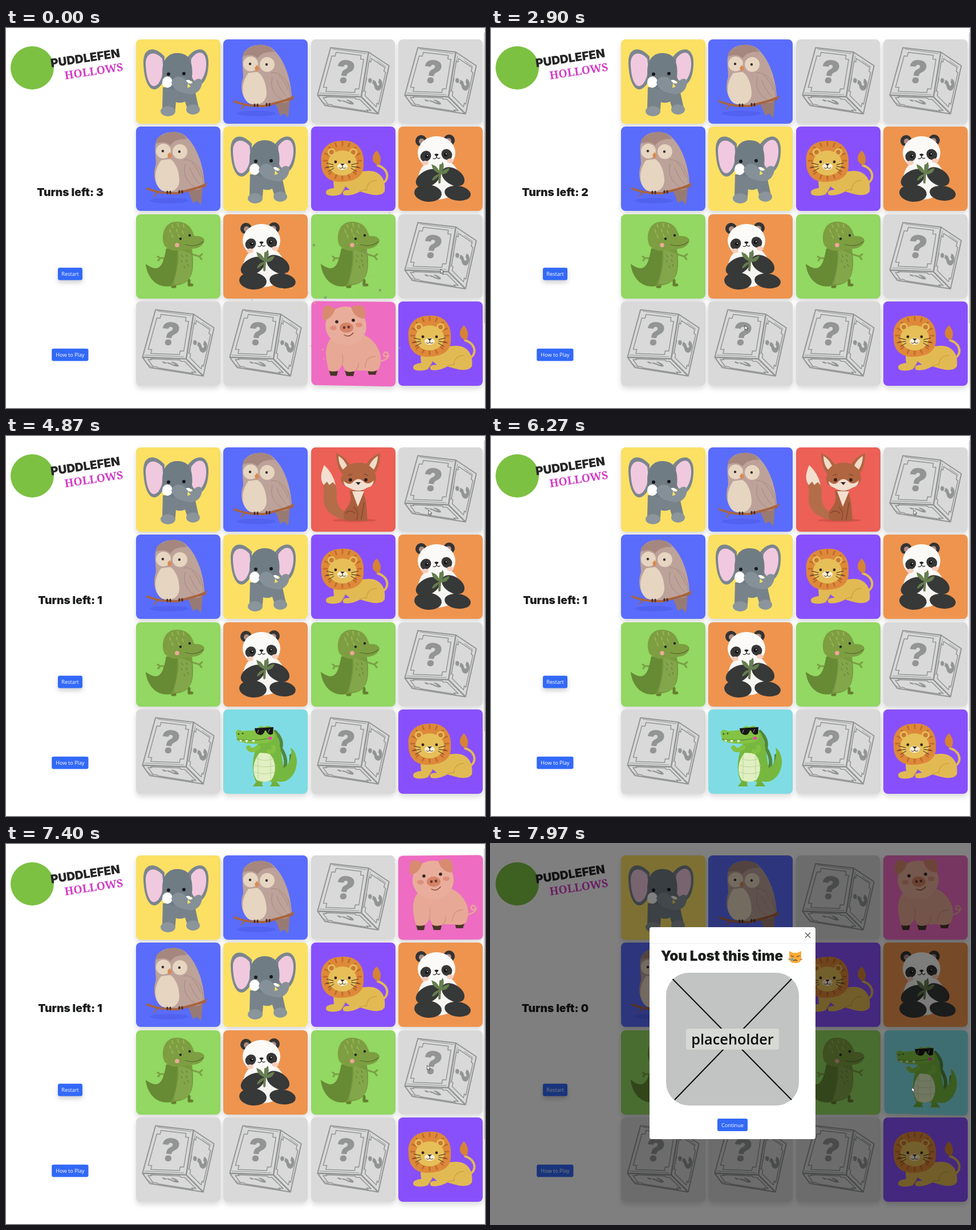
These frames come from a looping animation (840x667 px, 8000 ms). An HTML page:

```html
<!DOCTYPE html>
<html lang="en">
<head>
<meta charset="utf-8">
<title>Memory game</title>
<style>
html, body { margin: 0; width: 100%; height: 100%; overflow: hidden; background: #fff; }
#stage { position: relative; width: 100%; height: 100%; overflow: hidden; contain: strict; }
#stage > * { position: absolute; left: 0; top: 0; width: 840px; height: 667px; }
svg { display: block; overflow: hidden; }
text { text-anchor: middle; font-family: "Open Sans", sans-serif; }
.heavy { font-family: Inter, sans-serif; font-weight: 900; }
#stage > #grid { left: 228px; top: 20px; width: 607.5px; height: 607.5px; perspective: 1740px; }
.card { position: absolute; width: 147.5px; height: 147.5px; transform-style: preserve-3d; }
.face { position: absolute; inset: 0; border-radius: 8px; backface-visibility: hidden;
  box-shadow: 0 5px 10px rgba(0,0,0,.15); }
.front { transform: rotateY(180deg); }
#shade { background: #000; }
</style>
</head>
<body>
<div id="stage">
<svg>
  <circle cx="46" cy="70" r="38" fill="#7cc142"/>
  <g transform="translate(140 60) rotate(-8.5)">
    <text class="heavy" font-size="20.5" fill="#262626">PUDDLEFEN</text>
  </g>
  <g transform="translate(155 82.5) rotate(-8.5)">
    <text font-size="19.4" style="font-family:'Noto Serif',serif;font-weight:600" fill="#d23cc6">HOLLOWS</text>
  </g>
  <text id="turns" class="heavy" x="112.5" y="295" font-size="19.3" fill="#1c1f1c"></text>
  <rect x="91" y="420.7" width="43" height="21.7" rx="3" fill="#3269f6" style="filter:drop-shadow(0 4px 4px #0003)"/>
  <text x="112.5" y="435.3" font-size="9.2" fill="#fff">Restart</text>
  <rect x="80.2" y="562.8" width="64.3" height="21.7" rx="3" fill="#3269f6"/>
  <text x="112.5" y="577.3" font-size="9.2" fill="#fff">How to Play</text>
  <g id="bar"><path d="M838 0h2v667h-2z" fill="#f3f3f3"/><path d="M838 8h2v510h-2z" fill="#cfcfcf"/></g>
</svg>
<div id="grid"></div>
<svg><g id="confetti"></g></svg>
<div id="shade"></div>
<svg><g id="modal">
  <rect x="278" y="146" width="291" height="372" rx="4" fill="#fff"/>
  <path d="M278 174.5h291" stroke="#e9ecef"/>
  <path d="M551 155.5l9 9m0-9l-9 9" stroke="#555" stroke-width="1.3"/>
  <text class="heavy" x="405" y="205" font-size="24.2" fill="#1c1f1c">You Lost this time</text>
  <path d="M523 199L523 188L530 191H537L544 188V199Q545 209 533.5 209Q522 209 523 199Z" fill="#fbab38"/>
  <path d="M526 196l5 2m10-2l-5 2M530 205q3.5-3 7 0" fill="none" stroke="#5a3a24" stroke-width="1.3"/>
  <path d="M528 199q-4 5 0 6q4-1 0-6" fill="#4aa4ee"/>
  <path d="M521 202l4 1m21-1l-4 1" stroke="#8a5a2c"/>
  <rect x="307" y="226" width="233" height="233" rx="40" fill="#c2c3c3"/>
  <path d="M318.5 237L527 449M527 237L322 449" stroke="#0b0b0b" stroke-width="2"/>
  <rect x="342" y="324" width="163" height="37" rx="4" fill="#d7d9d4"/>
  <text x="423.5" y="351.5" font-size="25.3" font-weight="600" fill="#0b0b0b">placeholder</text>
  <rect x="397" y="482" width="53" height="22" rx="3" fill="#3269f6"/>
  <text x="423.5" y="496.5" font-size="9.2" fill="#fff">Continue</text>
</g></svg>
<svg><path id="cursor" d="M0 0V8L2 6.3L3.3 9.2L4.8 8.5L3.5 5.7H6Z" fill="#fff" stroke="#333" stroke-width=".8"/></svg>
</div>
<script>
const $ = id => document.getElementById(id);
const clamp = v => Math.max(0, Math.min(1, v));

// Drawing helpers: filled path, line, ellipse, several equal dots
const p = (fill, d) => `<path d="${d}" fill="${fill}"/>`;
const l = (stroke, w, d) =>
  `<path d="${d}" fill="none" stroke="${stroke}" stroke-width="${w}" stroke-linecap="round" stroke-linejoin="round"/>`;
const e = (fill, x, y, rx, ry = rx, turn = 0) =>
  `<ellipse cx="${x}" cy="${y}" rx="${rx}" ry="${ry}" fill="${fill}" transform="rotate(${turn} ${x} ${y})"/>`;
const dots = (fill, r, ...pts) => pts.map(([x, y]) => e(fill, x, y, r)).join('');

function dice() {
  const A = [34, 14], B = [101, 22], C = [88, 101], D = [11, 98], R = [137, 46], S = [118, 131], T = [24, 116];
  const ink = '#939595';
  const frame = (q, w, k, notch) => {
    const mid = [0, 1].map(i => q.reduce((s, v) => s + v[i], 0) / 4);
    const pts = q.map(v => v.map((c, i) => mid[i] + (c - mid[i]) * k));
    const mix = (a, b, f) => a.map((c, i) => c + (b[i] - c) * f);
    const path = pts.flatMap((v, i) => {
      const a = mix(v, pts[(i + 3) % 4], notch), b = mix(v, pts[(i + 1) % 4], notch);
      return [a, [a[0] + b[0] - v[0], a[1] + b[1] - v[1]], b];
    });
    return l(ink, w, 'M' + path.join('L') + 'Z');
  };
  const mark = (m, size) =>
    `<text class="heavy" transform="matrix(${m})" y="${size * .36}" font-size="${size}" fill="${ink}">?</text>`;
  return [[A, B, C, D], [B, R, S, C], [D, C, S, T]].map(q =>
      frame(q, 2, .99, 0) + frame(q, 1.5, .82, .1)).join('') +
    l(ink, 1, 'M38 17L97 25M15 94L84 97M18 109l14 8m84-80l15 11M92 92l6-24M104 29l-4 18') +
    mark('.98 .1 -.15 .98 60 57', 56) +
    mark('-.2 .85 -.7 -.3 112 77', 46) +
    mark('.4 .42 -.9 -.12 60 109', 40);
}

const rays = Array.from({ length: 16 }, (_, i) => {
  const a = i * Math.PI / 8, at = r => `${55 + r * Math.cos(a)} ${60 + r * Math.sin(a)}`;
  return `M${at(27)}L${at(33)}`;
}).join('');

const art = {
  elephant: ['#fbe064',
    p('#7b868e', 'M50 30C32 10 12 14 13 42C14 74 24 92 36 87C46 82 50 70 50 60ZM90 32C106 10 126 14 127 38C128 64 118 84 106 80C98 77 92 66 92 60Z') +
    p('#f1c9df', 'M46 34C32 18 16 24 17 44C18 72 26 86 35 81C44 76 47 60 48 50ZM97 34C108 18 122 20 123 40C124 60 114 78 106 75C98 72 96 60 95 50Z') +
    p('#77828a', 'M47 84L46 124Q46 133 58 133Q69 132 69 122L70 110Q78 113 86 109L90 122Q92 131 103 131Q113 128 109 116L102 84Z') +
    e('#8b959b', 56, 126, 13, 9) + e('#8b959b', 100, 123, 12, 9) +
    p('#707c84', 'M72 24C48 24 43 50 48 70C50 84 62 90 78 88C98 86 100 66 98 48C96 32 88 24 72 24Z') +
    e('#fff', 55, 75, 9, 10) + e('#fff', 91, 78, 7) +
    p('#869098', 'M62 76C66 62 82 62 89 74Q96 82 103 72Q110 66 116 72C116 92 102 99 88 95C74 92 66 88 62 76Z') +
    p('#fbe064', 'M91 77l5 6l-6 2z') + dots('#17191b', 3, [57, 61], [84, 60])],
  owl: ['#5a6cfb',
    e('#5162f0', 58, 130, 34, 5) +
    p('#987a75', 'M90 110L100 134L107 130L114 138L117 106Z') +
    p('#bda29a', 'M36 24C44 9 66 7 82 13C104 28 118 64 120 99C119 110 108 112 96 111C80 116 58 117 48 113C32 104 29 84 35 66C35 52 31 36 36 24Z') +
    p('#a6877f', 'M36 22Q48 10 68 9L82 13L90 22Q70 20 60 33Q50 24 35 30Z') +
    p('#e6d5c0', 'M44 59C31 76 30 102 45 112C60 118 76 112 76 94C75 74 68 62 60 57Z') +
    l('#a6877f', 1, 'M84 58C108 58 118 80 118 100M86 66q-6 26 17 40m-5-43q10 10 16 26M94 72q7 19 17 28') +
    dots('#e6d5c0', 13, [48, 43], [77, 44]) + dots('#3a2c33', 2.2, [47, 43], [76, 44]) +
    p('#d98a50', 'M59 45l4 6l-5 6l-3-7z') +
    l('#a8643f', 4, 'M20 109Q42 118 72 117L121 104') + l('#a8643f', 2, 'M96 111l28-11M38 115l-6 7') +
    l('#49302c', 3, 'M55 114v3m5-3v3M76 113v3m5-3v3')],
  lion: ['#8850fd',
    l('#e2ba54', 4, 'M121 102C140 94 136 74 117 68') + p('#d68336', 'M119 68C104 64 106 50 115 42C123 50 124 60 119 68Z') +
    p('#e2ba54', 'M38 82L40 108Q22 110 27 119Q36 124 52 119L60 105L68 111Q52 111 57 120Q70 123 86 114L100 118Q122 124 129 114C132 92 120 76 98 78Z') +
    l('#c99f3e', 1.2, 'M60 105q-4 9-9 14M97 112q2-18 18-17M86 113l12-3') +
    p('#de893a', 'M55 25C82 23 94 44 92 64C94 87 78 96 55 97C32 99 17 86 18 62C15 39 32 24 55 25Z') +
    l('#c06e2d', 3, rays) + dots('#e7bf59', 7, [36, 45], [74, 45]) + dots('#c77a35', 4, [36, 45], [74, 45]) +
    e('#e7bf59', 55, 64, 25, 22) + e('#fff1d2', 55, 70, 9, 6) + dots('#332722', 2.4, [43, 62], [67, 62]) +
    p('#332722', 'M51 65h8l-4 4z') +
    l('#332722', 1, 'M55 69v3q-4 3-6 0m6 0q4 3 6 0M39 67l-12-3m12 6l-13 2m14 1l-10 6M71 67l12-3m-12 6l13 2m-14 1l10 6')],
  panda: ['#ee944e',
    dots('#343434', 10, [40, 25], [89, 24]) + dots('#ad8b82', 5, [41, 26], [88, 25]) +
    e('#f6f5f2', 71, 92, 36, 36) + e('#fbfaf7', 67, 46, 33, 29) +
    e('#373737', 48, 52, 9, 10, 40) + e('#373737', 85, 49, 9, 10, -40) +
    dots('#111', 3, [50, 52], [83, 49]) + dots('#fff', 1, [51, 51], [84, 48]) + p('#252525', 'M63 49q4-3 8 0l-4 4z') +
    l('#252525', 1.2, 'M67 53q-1 5-6 3m6-3q2 5 6 2') + e('#f5cdbd', 47, 64, 6, 4) + e('#f5cdbd', 91, 60, 6, 4) +
    e('#373838', 52, 91, 23, 14, -28) + e('#373838', 96, 88, 22, 14, 32) +
    e('#373838', 52, 117, 24, 15, 5) + e('#373838', 104, 117, 23, 13, 8) +
    l('#6b7d52', 4, 'M74 68L72 98') +
    p('#667f50', 'M73 83Q60 79 58 66Q71 70 73 83Q70 71 78 62Q83 74 73 83Q81 73 90 73Q86 86 73 83Q67 93 59 95Q61 85 73 83')],
  lizard: ['#92d862',
    l('#7ba044', 3, 'M52 77L42 77l-4-3m4 3l-3 4M98 70l13 4l5-4m-5 4l4 5') +
    l('#667f2f', 5, 'M68 116v11h-4m29-11v8h5') +
    p('#769941', 'M53 60C48 88 42 106 17 87C20 114 40 132 67 125C95 124 105 106 98 61Z') +
    p('#678a35', 'M53 60C48 88 42 106 17 87C20 114 40 132 62 125C72 103 74 76 72 58Z') +
    p('#83a64b', 'M73 60C77 76 72 103 66 122C94 125 102 107 97 70Z') +
    p('#7d9e41', 'M71 13C47 13 43 42 50 55C60 67 78 65 90 61Q116 62 120 46Q118 37 102 38C97 20 87 13 71 13Z') +
    l('#9ab554', 2, 'M63 18l2 5m8-7l2 6m8-4l1 5M59 27l2 5m10-6l1 5m9-2l2 5M63 36l2 5m9-6l2 5') +
    l('#6b8937', 1.5, 'M80 72l2 3m6-4l2 3M79 81l2 3m7-4l2 3M84 91l2 3m4-6l2 3') +
    dots('#222c1b', 2.2, [78, 43], [94, 37]) + e('#f0a79c', 72, 54, 3.8) + l('#526c2d', 1.2, 'M86 53q18 6 32-5')],
  pig: ['#ee6cc2',
    l('#e7aa98', 2.5, 'M122 104q15-4 13-12q-5-8-8 0q0 6 9 2') +
    p('#483426', 'M31 121l3 10h11l2-8zm28 0l3 10h12l2-8zm40-2l2 9h12l3-9z') +
    p('#e7a996', 'M40 58C21 78 25 98 31 122Q40 126 49 120L55 111L60 122Q68 126 78 121L96 121Q113 125 119 117C130 92 112 64 88 57Z') +
    l('#d68f7c', 1.3, 'M54 112q3-8 1-18m23 27q6-6 5-13M95 116q0-20 18-20') +
    e('#e9ae9b', 61, 43, 36, 34) +
    p('#d88b70', 'M42 13Q26 4 22 11Q17 30 23 34Q38 29 42 13ZM70 10Q84 4 92 9Q98 22 94 30Q76 30 70 10Z') +
    e('#dd8f7c', 39, 47, 6, 4) + e('#dd8f7c', 84, 41, 6, 4) + dots('#30231f', 2.8, [45, 36], [74, 33]) +
    e('#d58367', 62, 46, 12, 9) + dots('#6b392e', 2.4, [58, 46], [66, 45]) + l('#7f4539', 1.3, 'M58 59q9 5 16-4')],
  croc: ['#7fdce4',
    l('#52883a', 6, 'M91 39Q105 53 101 68Q116 92 104 109Q120 104 119 81') +
    p('#76b83f', 'M64 54C50 78 49 110 57 126L59 132H68L69 126H84L86 132H96L94 126C115 132 130 111 129 89Q127 72 118 67Q123 91 106 103C102 80 99 51 91 40Z') +
    p('#e1efc3', 'M64 76C51 91 50 112 59 124Q72 130 84 124C95 110 92 87 80 77Z') +
    l('#b7d695', 1, 'M58 86q14 7 31 0M55 98q18 6 37 0M55 110q18 6 35 0M61 80v42m22-42v41') +
    l('#83c243', 8, 'M61 66Q50 76 44 67M88 66Q91 75 80 74') +
    p('#83c243', 'M22 41Q23 33 34 38L59 36Q63 26 72 31Q84 24 90 40Q92 58 72 59Q47 63 25 55Z') +
    l('#4d7f31', 1.2, 'M24 52q24 5 54-1') + p('#fff', 'M28 53l3 4l2-3zm10 1l3 4l3-4zm12 0l3 4l3-4z') +
    p('#e24aa5', 'M79 48h6v5h-6z') + dots('#395e28', 1.5, [27, 43], [34, 42]) +
    p('#171717', 'M55 33L88 31L87 43Q79 47 75 37H73Q70 47 62 44Q56 43 55 33Z') + l('#aaa', 1, 'M62 36l-2 5m21-6l-2 5') +
    p('#6faf3b', 'M54 132q7-10 14 0l2 3H52zm30 0q7-10 14 0l2 3H82z')],
  fox: ['#ec6056',
    e('#d5524a', 76, 128, 38, 3) +
    p('#b36d49', 'M67 128C42 126 20 112 22 87C25 68 14 54 23 31C36 44 47 65 45 90C46 104 54 113 68 116Z') +
    p('#f3dfcf', 'M23 31C16 47 16 57 22 66L28 60L32 66L38 61L43 66Q39 46 23 31Z') +
    p('#a95f3d', 'M67 76C76 98 60 105 57 116Q55 130 70 129H99Q98 112 96 94L91 74Z') +
    p('#f3dfcf', 'M72 77l10 27l11-27z') + l('#814632', 1.4, 'M75 105q10 8 5 22m13-30l-5 29M61 115q8-7 16 1') +
    p('#b16541', 'M44 10Q58 15 68 30Q82 24 97 29Q105 16 121 10Q121 34 112 45Q119 62 102 69Q82 80 64 70Q47 62 55 47Q44 34 44 10Z') +
    p('#f1dbc8', 'M48 15Q57 20 63 32L56 39Q48 30 48 15ZM117 15Q107 21 102 32L110 39Q117 28 117 15Z') +
    p('#f3dfcf', 'M57 59Q68 69 75 59Q83 52 91 59Q99 68 110 58Q109 69 98 71Q83 81 67 71Q57 68 57 59Z') +
    dots('#2d211e', 3, [69, 57], [96, 57]) + p('#302320', 'M78 61h9l-4 5z') + l('#754133', 1.2, 'M65 49l7-2m21 0l7 2')]
};

const layout = `elephant owl fox pig owl elephant lion panda
  lizard panda lizard croc pig croc pig lion`.split(/\s+/);
// Per card: [start, duration, face up]; cards without an entry stay open
const flips = {
  2: [[4250, 600, 1], [6270, 470, 0]],
  3: [[6900, 600, 1]],
  11: [[300, 600, 1], [2470, 450, 0], [7543, 690, 1]],
  12: [],
  13: [[3370, 600, 1], [6270, 470, 0]],
  14: [[-460, 600, 1], [2470, 450, 0]]
};

const face = (cls, color, body) =>
  `<div class="face ${cls}" style="background:${color}"><svg width="147.5" height="147.5">${body}</svg></div>`;
const back = face('', '#d9d9d9', dice());
$('grid').innerHTML = layout.map((name, i) => `<div class="card" style="left:${i % 4 * 153.4}px;top:${(i >> 2) * 153.4}px">
  ${back}${face('front', ...art[name])}</div>`).join('');
const cards = [...document.querySelectorAll('.card')];

const rnd = n => { const v = Math.sin(n * 127.1) * 43758.5; return v - Math.floor(v); };
const bits = [[540, 381], [627, 450], [656, 460], [560, 473]];
for (let i = 1; i < 24; i++) bits.push([425 + 270 * rnd(i), 310 + 280 * rnd(i + 50)]);
$('confetti').innerHTML = bits.map(([x, y], i) => i < 4 ? e('#777', x, y, 2.2) :
  e(['#e5d94f', '#8acb72', '#a8a3dd', '#ddb29c'][i % 4], x, y, 2, 1, i * 40)).join('');

// cubic-bezier(.25, .1, .25, 1)
function ease(x) {
  if (x <= 0 || x >= 1) return clamp(x);
  const bez = (a, b, u) => 3 * a * u * (1 - u) ** 2 + 3 * b * u * u * (1 - u) + u ** 3;
  let lo = 0, hi = 1;
  for (let i = 0; i < 20; i++) {
    const u = (lo + hi) / 2;
    if (bez(.25, .25, u) < x) lo = u; else hi = u;
  }
  return bez(.1, 1, lo);
}

function angle(i, t) {
  if (!flips[i]) return 180;
  const f = flips[i].filter(f => f[0] <= t).pop();
  if (!f) return 0;
  const k = ease((t - f[0]) / f[1]);
  return 180 * (f[2] ? k : 1 - k);
}

// Pointer moves: [start, end, x, y]
const moves = [[870, 1270, 445, 522], [3500, 3970, 597, 160], [4400, 4870, 741, 130], [7130, 7480, 738, 427]];
function pointer(t) {
  let x = 762, y = 423;
  for (const [a, b, tx, ty] of moves) {
    const u = clamp((t - a) / (b - a)), k = u * u * (3 - 2 * u);
    x += (tx - x) * k;
    y += (ty - y) * k;
  }
  return `translate(${x}px,${y}px)`;
}

function draw(now) {
  let t = now % 8000;
  if (t > 7700 && t < 7770) t = 7700;
  cards.forEach((c, i) => c.style.transform = `rotateY(${angle(i, t)}deg)`);
  $('turns').textContent = 'Turns left: ' + (t < 300 ? 3 : t < 4250 ? 2 : t < 7543 ? 1 : 0);
  $('confetti').style.opacity = .6 * clamp(1 - t / 450);
  $('confetti').style.transform = `translateY(${t * .08}px)`;
  $('shade').style.opacity = .5 * clamp((t - 7619) / 150);
  $('bar').style.opacity = t < 7619 ? 1 : 0;
  const k = 1 - (1 - clamp((t - 7730) / 220)) ** 2;
  $('modal').style.opacity = k;
  $('modal').style.transform = `translateY(${-30 * (1 - k)}px)`;
  $('cursor').style.transform = pointer(t);
}

const start = performance.now();
function loop() {
  draw(performance.now() - start);
  requestAnimationFrame(loop);
}
loop();
</script>
</body>
</html>
```
